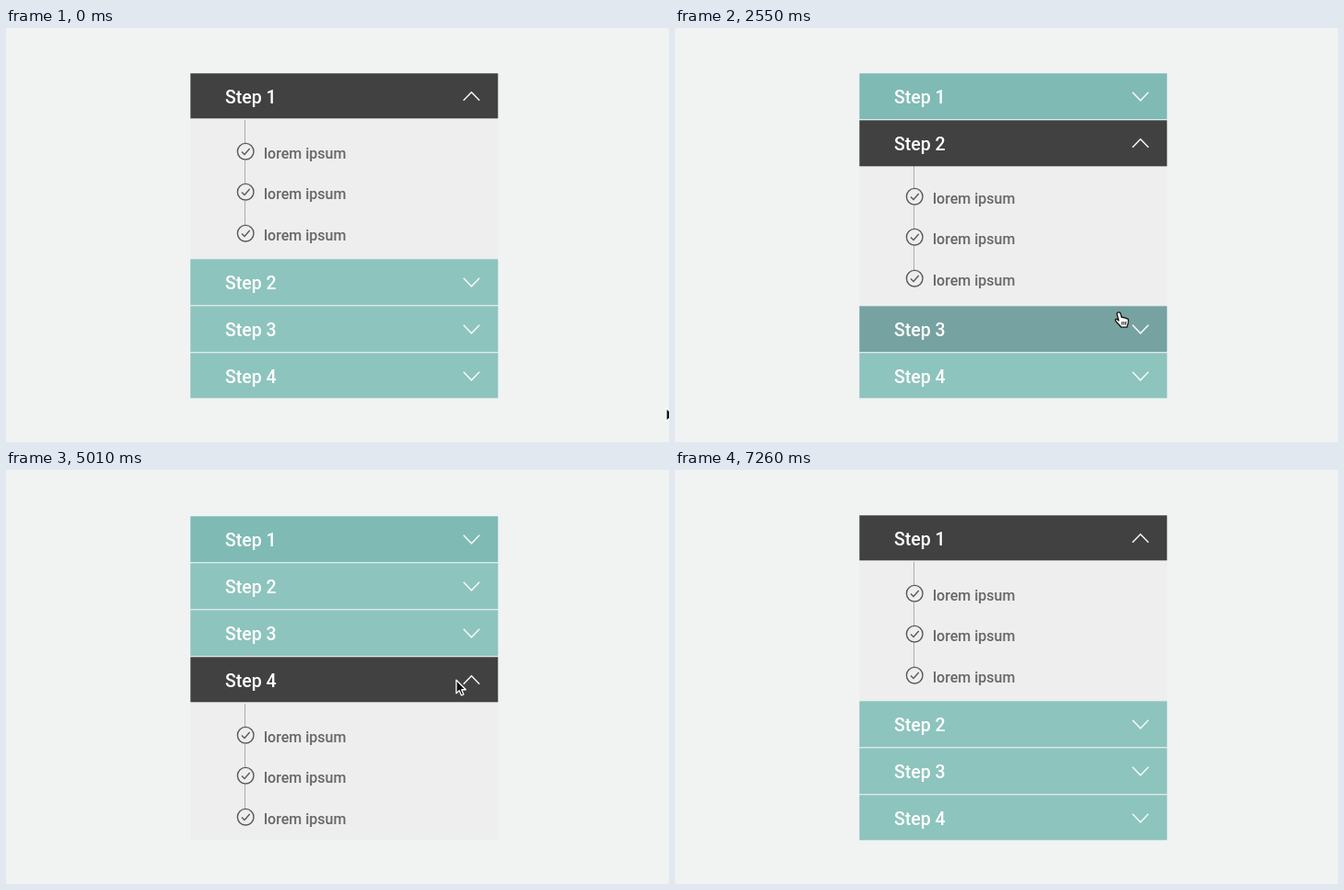
An HTML page with a canvas that plays this animation: 720x450 px, repeating every 8.52 s.

```html
<!DOCTYPE html>
<html lang="en">
<head>
<meta charset="utf-8">
<title>Step accordion</title>
<style>
  html, body { margin: 0; width: 100%; height: 100%; overflow: hidden; background: #f0f3f2; }
  canvas { display: block; }
</style>
</head>
<body>
<canvas width="720" height="450"></canvas>
<script>
const ctx = document.querySelector('canvas').getContext('2d');
const LOOP = 8520, LEFT = 200.3, WIDTH = 334, PITCH = 51, BOTTOM = 402.3;

// Each click opens the next step; the pointer shape follows after a short lag
const CLICKS = [1800, 2910, 4020, 6420], SHAPE_LAG = 210;
const FIRST_ITEM = [134, 183, 237, 288];

// Pointer moves: start, end, x, y
const START = { x: 717, y: 413 };
const MOVES = [
  [0, 900, 521, 373],
  [860, 1590, 484, 276],
  [2340, 2660, 480, 320],
  [3330, 3750, 474, 371],
  [4230, 5030, 489, 228],
  [5030, 6270, 482, 76],
  [6630, 7260, 722, 141]
];

const HAND = new Path2D('M4 1C5.5.3 6.5 1.5 7 3L8 6.5C9 5.8 10 6 10.4 7C11.5 6.4 12.5 6.8 12.8 7.7' +
  'C14.2 7.3 15.2 8 15.3 9.5C15.5 12 15 13.5 14 16L13.8 17H7.3C6.5 15.5 4 13.5 2.5 11.5' +
  'C.5 9.5 1 8 2.5 8.3C3.5 8.5 4 9 4.8 9.8L3 3.5C2.6 2.2 3 1.2 4 1Z');
const KNUCKLES = new Path2D('M8.5 11V14.5M10.5 11V14.5M12.5 11V14.5');
const ARROW = new Path2D('M0 0V14.5L3.3 11.4L5.6 16.7L8 15.7L5.8 10.5H10.4Z');

const openStep = t => CLICKS.filter(at => t >= at).length % 4;

// Rows up to the open one stack from the top, the others sit at the bottom
const rowTop = (row, open) =>
  row * PITCH + (row > open ? 200.3 : open < 2 ? 49.3 : 50.3);

const rowHeight = (row, open) => row === 3 || row + open === 0 ? 49 : 50;

function pointerAt(t) {
  return MOVES.reduce((pos, [start, end, x, y]) => {
    const u = Math.min(1, Math.max(0, (t - start) / (end - start)));
    const k = u * u * (3 - 2 * u);
    return { x: pos.x + (x - pos.x) * k, y: pos.y + (y - pos.y) * k };
  }, START);
}

function rowAt({ x, y }, open) {
  if (x < LEFT || x > LEFT + WIDTH) return -1;
  return [0, 1, 2, 3].findIndex(row => {
    const depth = y - rowTop(row, open);
    return depth >= 0 && depth < rowHeight(row, open);
  });
}

function fillBand(color, top, height) {
  ctx.fillStyle = color;
  ctx.fillRect(LEFT, top, WIDTH, height);
}

function line(color, width, ...points) {
  ctx.strokeStyle = color;
  ctx.lineWidth = width;
  ctx.beginPath();
  points.forEach(([x, y]) => ctx.lineTo(x, y));
  ctx.stroke();
}

function text(str, x, y, size, color) {
  ctx.font = `500 ${size}px Roboto, sans-serif`;
  ctx.fillStyle = color;
  ctx.fillText(str, x, y);
}

function drawHeader(row, open, hovered) {
  const top = rowTop(row, open), height = rowHeight(row, open), active = row === open;
  if (row) fillBand('#e4f0ee', top - 1, height);
  fillBand(active ? '#414141' : hovered ? '#76a2a1' : row ? '#8dc4bd' : '#7fbab5', top, height);
  text('Step ' + (row + 1), 238, top + 32.2, 19.5, '#fff');
  const mid = top + 25, bend = active ? -4.5 : 4.5;
  line('#f4f8f7', 1.5, [496.8, mid - bend], [505.5, mid + bend], [514.2, mid - bend]);
}

function drawItems(open) {
  for (let i = 0; i < 3; i++) {
    const y = FIRST_ITEM[open] + Math.floor(44.5 * i);
    line('#adadad', 1, [259.5, y - (i ? 35 : 34)], [259.5, y - 9]);
    ctx.strokeStyle = '#595959';
    ctx.lineWidth = 1.4;
    ctx.beginPath();
    ctx.arc(260.2, y + 0.2, 8.8, 0, 2 * Math.PI);
    ctx.stroke();
    line('#595959', 1.4, [256, y + 0.5], [259, y + 3.5], [264.7, y - 3]);
    text('lorem ipsum', 280, y + 7.5, 16, '#666');
  }
}

function drawPointer({ x, y }, isHand) {
  const shape = isHand ? HAND : ARROW;
  ctx.save();
  ctx.lineJoin = 'round';
  ctx.translate(isHand ? x - 4 : x, y);
  ctx.fillStyle = isHand ? '#fff' : '#111';
  ctx.strokeStyle = isHand ? '#111' : '#fff';
  ctx.lineWidth = 1.3;
  ctx.fill(shape);
  ctx.stroke(shape);
  if (isHand) {
    ctx.lineWidth = 1;
    ctx.stroke(KNUCKLES);
  }
  ctx.restore();
}

function draw(t) {
  const open = openStep(t), shapeOpen = openStep(t - SHAPE_LAG);
  const pos = pointerAt(t);
  const hovered = rowAt(pos, open), shapeRow = rowAt(pos, shapeOpen);

  ctx.fillStyle = '#f0f3f2';
  ctx.fillRect(0, 0, 720, 450);
  const contentTop = rowTop(open, open) + rowHeight(open, open);
  fillBand('#eee', contentTop, BOTTOM - contentTop);
  drawItems(open);
  for (let row = 0; row < 4; row++) drawHeader(row, open, row === hovered);
  drawPointer(pos, shapeRow >= 0 && shapeRow !== shapeOpen);
}

const start = performance.now();
function tick() {
  draw((performance.now() - start) % LOOP);
  requestAnimationFrame(tick);
}
tick();
</script>
</body>
</html>
```
